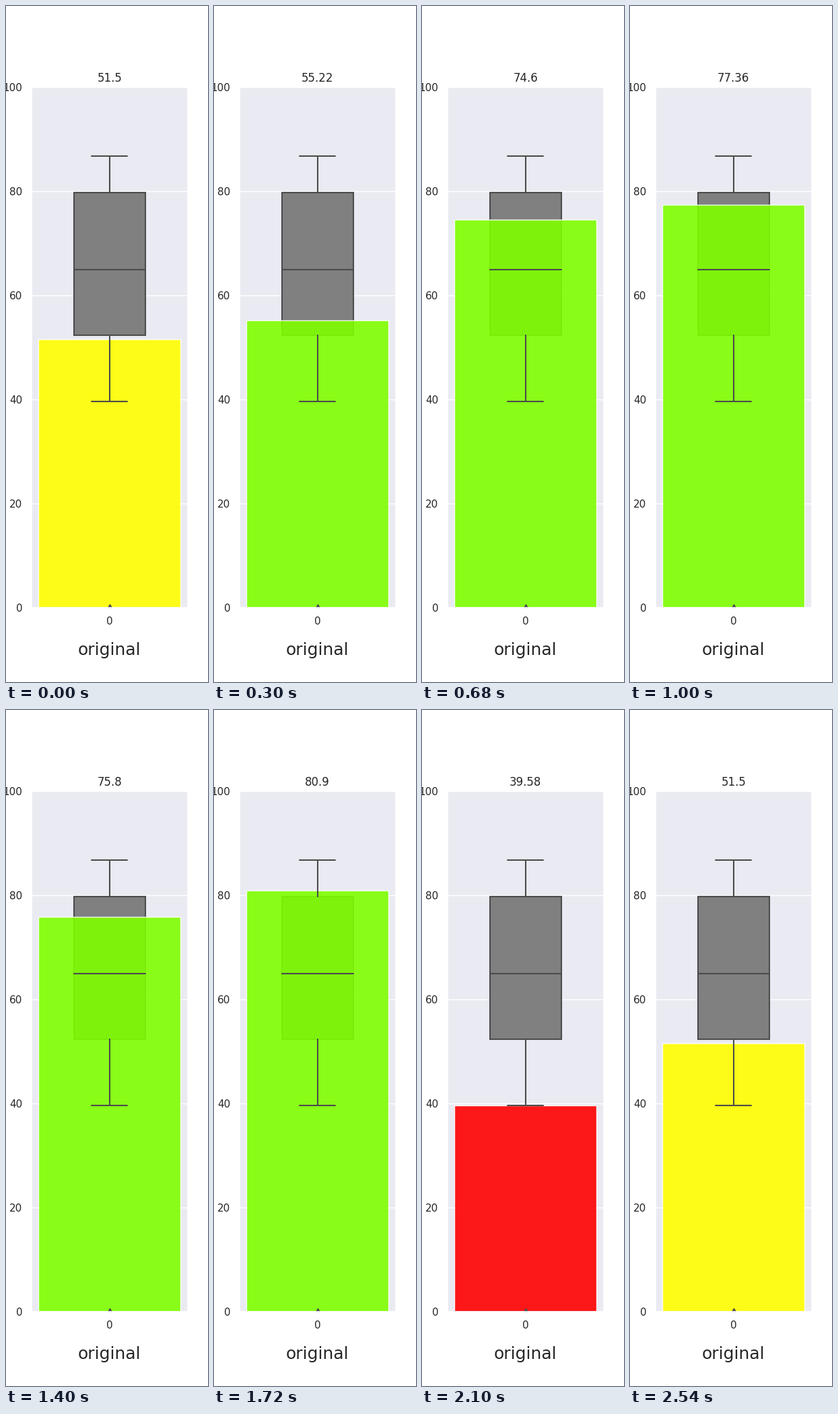
A matplotlib script for the animation above (2560 ms loop, 300 px wide and 1000 px high).

```python
import numpy as np
import matplotlib.pyplot as plt
from matplotlib.animation import FuncAnimation
from matplotlib.patches import Rectangle

plt.rcParams["font.family"] = "DejaVu Sans"
INK, LINE, PANEL = "0.15", "#4c4c4c", "#eaeaf2"
LOW, Q1, MEDIAN, Q3, HIGH = 39.58, 52.34, 64.97, 79.74, 86.77

# Bar height at key steps; the sequence plays forward, then backward.
KEYS = [(0, 51.5), (4, 60.2), (7, 55.22), (10, 39.58), (13, 46.72),
        (15, 64.97), (18, 74.6), (21, 80.9), (24, 86.77), (26, 77.36),
        (28, 73.6), (31, 82.4)]
STEPS = 32
TICK = 20


def height_at(step):
    for (s0, v0), (s1, v1) in zip(KEYS, KEYS[1:]):
        if step <= s1:
            ease = (1 - np.cos(np.pi * (step - s0) / (s1 - s0))) / 2
            return round(float(v0 + (v1 - v0) * ease), 2)


def color_for(value):
    if value < 40:
        return "red"
    return "yellow" if value < Q1 else "chartreuse"


# Every fourth step of the pass is held for five ticks.
forward = list(range(STEPS))
timeline = [s for s in forward + forward[::-1]
            for _ in range(5 if s % 4 == 2 else 1)]

fig = plt.figure(figsize=(3, 10), dpi=100, facecolor="white")
ax = fig.add_axes([0.125, 0.11, 0.775, 0.77], facecolor=PANEL)
ax.set(xlim=(-0.44, 0.44), ylim=(0, 100), xticks=[0], yticks=range(0, 101, 20))
ax.set_axisbelow(True)
ax.grid(axis="y", color="white", lw=1)
ax.tick_params(length=0, pad=9.5, labelsize=11, labelcolor=INK)
for spine in ax.spines.values():
    spine.set(color="white", linewidth=1.25)
fig.text(0.5125, 0.04, "original", ha="center", va="baseline",
         size=18, color=INK)
title = ax.set_title("", size=12, color=INK)


def stroke(xs, ys):
    ax.plot(xs, ys, color=LINE, lw=1.5, solid_capstyle="round", zorder=2)


ax.add_patch(Rectangle((-0.2, Q1), 0.4, Q3 - Q1, fc="#808080", ec=LINE,
                       lw=1.5, zorder=1))
bar = ax.add_patch(Rectangle((-0.4, 0), 0.8, 1, ec="white", lw=1,
                             alpha=0.9, zorder=1.1))
for start, end in ((Q1, LOW), (Q3, HIGH)):
    stroke([0, 0], [start, end])
    stroke([-0.1, 0.1], [end, end])
stroke([-0.2, 0.2], [MEDIAN, MEDIAN])
ax.plot([0], [0], "d", ms=5, color=LINE, zorder=2)


def update(frame):
    value = height_at(timeline[frame])
    bar.set_height(value)
    bar.set_facecolor(color_for(value))
    title.set_text(str(value))
    return bar, title


anim = FuncAnimation(fig, update, frames=len(timeline), interval=TICK,
                     repeat=True, repeat_delay=0, blit=False)
plt.show()
```
